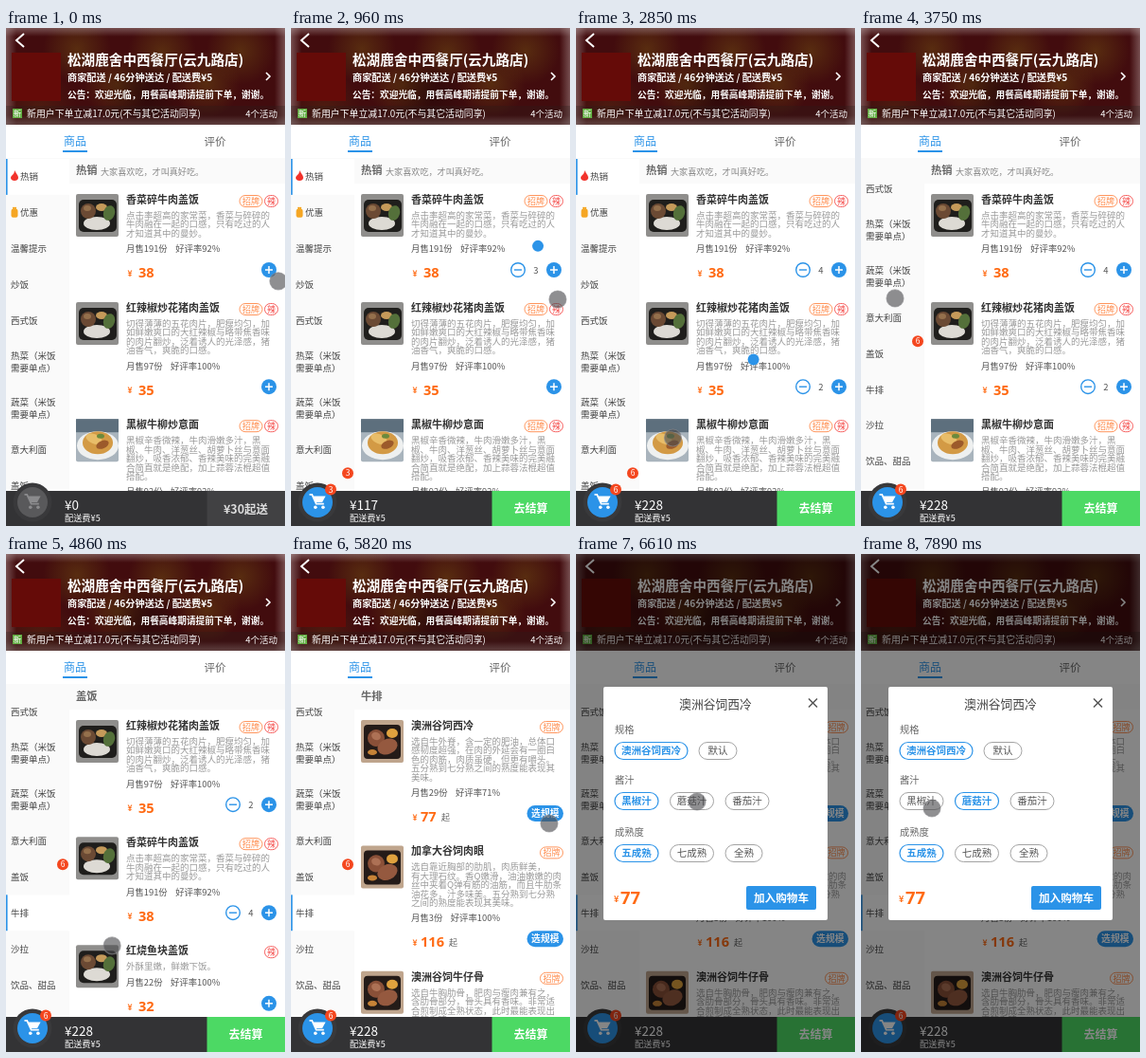
Write an HTML page with a canvas that moves like this. It is 295 by 525 pixels and loops after 8 s.

```html
<!DOCTYPE html>
<html lang="zh-CN">
<head>
<meta charset="utf-8">
<title>点餐</title>
<style>
html, body { margin: 0; width: 100%; height: 100%; overflow: hidden; background: #fff; }
canvas { display: block; width: 295px; height: 525px; }
</style>
</head>
<body>
<canvas id="stage"></canvas>
<script>
const W = 295, H = 525, LOOP = 8000;
const LIST_TOP = 137, BAR_TOP = 488, SIDE_W = 67, LINE = 9.2;
const BLUE = '#2b93e8', ORANGE = '#ff6a13', RED = '#f4471f', GREEN = '#4cd964';
const FONT = '"Noto Sans CJK SC", "Noto Sans CJK", "Noto Sans", sans-serif';
const PRICE_FONT = '"Noto Sans", sans-serif';

const canvas = document.getElementById('stage');
const ctx = canvas.getContext('2d');
const ratio = window.devicePixelRatio || 1;
canvas.width = W * ratio;
canvas.height = H * ratio;

// Menu content
const pork = {
  name: '红辣椒炒花猪肉盖饭', photo: 'rice', tags: ['招牌', '辣'], sold: 97, rate: 100, price: 35, id: 'pork',
  desc: ['切得薄薄的五花肉片，肥瘦均匀，加', '如鲜嫩爽口的大红辣椒与略带焦香味', '的肉片翻炒，泛着诱人的光泽感，猪', '油香气，爽脆的口感。']
};
const beef = {
  name: '香菜碎牛肉盖饭', photo: 'rice', tags: ['招牌', '辣'], sold: 191, rate: 92, price: 38, id: 'beef',
  desc: ['点击率超高的家常菜，香菜与碎碎的', '牛肉融在一起的口感，只有吃过的人', '才知道其中的曼妙。']
};
const pasta = {
  name: '黑椒牛柳炒意面', photo: 'pasta', tags: ['招牌', '辣'], sold: 92, rate: 92, price: 36,
  desc: ['黑椒辛香微辣，牛肉滑嫩多汁，黑', '椒、牛肉、洋葱丝、胡萝卜丝与意面', '翻炒，吸香浓郁、香辣美味的完美融', '合简直就是绝配，加上蒜蓉法棍超值', '搭配。']
};
const fish = {
  name: '红烧鱼块盖饭', photo: 'rice', tags: ['辣'], sold: 22, rate: 100, price: 32,
  desc: ['外酥里嫩，鲜嫩下饭。']
};
const steak = (name, sold, rate, price, desc) =>
  ({ name, sold, rate, price, desc, photo: 'steak', tags: ['招牌'], options: true });

const hot = { title: '热销', note: '大家喜欢吃，才叫真好吃。', items: [beef, pork, pasta] };
const rice = { title: '盖饭', items: [pork, beef, fish] };
const steaks = { title: '牛排', items: [
  steak('澳洲谷饲西冷', 29, 71, 77, ['选自牛外脊，含一定的肥油，总体口', '感韧度超强，在肉的外延会有一圈白', '色的肉筋，肉质虽硬，但更有嚼头。', '五分熟到七分熟之间的熟度能表现其', '美味。']),
  steak('加拿大谷饲肉眼', 3, 100, 116, ['选自靠近胸部的肋肌，肉质鲜美，', '有大理石纹。香Q嫩滑，油油嫩嫩的肉', '丝中夹着Q弹有筋的油筋，而且牛肋条', '油花多，汁多味美。五分熟到七分熟', '之间的熟度能表现其美味。']),
  steak('澳洲谷饲牛仔骨', 8, 100, 98, ['选自牛胸肋骨，肥肉与瘦肉兼有之，', '含肋骨部分，骨头具有香味。非常适', '合煎制成全熟状态，此时最能表现出', '肉的香味。'])
] };
const categories = [['热销'], ['优惠'], ['温馨提示'], ['炒饭'], ['西式饭'], ['热菜（米饭', '需要单点）'],
  ['蔬菜（米饭', '需要单点）'], ['意大利面'], ['盖饭'], ['牛排'], ['沙拉'], ['饮品、甜品']];

// Timeline
const taps = [[150, 'beef'], [540, 'beef'], [935, 'beef'], [1320, 'beef'], [2040, 'pork'], [2705, 'pork']]
  .map(([time, id]) => ({ time, id }));
const FLIGHT = 405, PICK_STEAK = 4860, OPEN_DIALOG = 5940, PICK_SAUCE = 7500;
const tapPoint = { beef: [277, 243], pork: [277, 390] };
const pointerPath = [
  [0, 288, 267], [150, 277, 244], [930, 277, 244], [960, 282, 286], [1100, 282, 284],
  [1300, 277, 245], [1500, 277, 245], [1950, 277, 390], [2705, 277, 390], [2850, 103, 432],
  [2990, 30, 430], [3240, 34, 310], [3510, 36, 260], [3800, 36, 290], [4440, 22, 384],
  [4560, 25, 385], [4740, 25, 385], [4860, 112, 413], [5400, 190, 350], [5820, 273, 284],
  [5940, 273, 284], [6060, 270, 306], [6610, 128, 261], [6920, 127, 259], [7220, 129, 262],
  [7500, 128, 261], [7690, 102, 296], [7890, 75, 268], [8000, 75, 268]
];
const sidePath = [[0, 0], [2990, 0], [3120, 55], [3240, 110], [3360, 133], [3700, 139], [4440, 142], [LOOP, 142]];

function along(path, t) {
  const i = Math.max(1, path.findIndex(p => p[0] >= t));
  const a = path[i - 1], b = path[i];
  const k = (t - a[0]) / (b[0] - a[0]);
  return a.slice(1).map((v, n) => v + (b[n + 1] - v) * k);
}
const easeInOut = k => k * k * (3 - 2 * k);
const clamp01 = k => Math.min(1, Math.max(0, k));

// Drawing helpers
function text(str, x, y, size, color, { bold = false, align = 'left', font = FONT } = {}) {
  ctx.font = `${bold ? 'bold ' : ''}${size}px ${font}`;
  ctx.textAlign = align;
  ctx.textBaseline = 'alphabetic';
  ctx.fillStyle = color;
  ctx.fillText(str, x, y + size * 0.37);
}
function rect(x, y, w, h, color) {
  ctx.fillStyle = color;
  ctx.fillRect(x, y, w, h);
}
function ellipse(x, y, rx, ry, color, turn = 0) {
  ctx.beginPath();
  ctx.ellipse(x, y, rx, ry, turn, 0, 7);
  ctx.fillStyle = color;
  ctx.fill();
}
const disc = (x, y, r, color) => ellipse(x, y, r, r, color);
function stroke(points, color, width) {
  ctx.beginPath();
  points.forEach(([x, y]) => ctx.lineTo(x, y));
  ctx.strokeStyle = color;
  ctx.lineWidth = width;
  ctx.stroke();
}
function box(x, y, w, h, r, fill, line, width = 1) {
  ctx.beginPath();
  ctx.roundRect(x, y, w, h, r);
  if (fill) { ctx.fillStyle = fill; ctx.fill(); }
  if (line) { ctx.strokeStyle = line; ctx.lineWidth = width; ctx.stroke(); }
}
function glow(x, y, r, rgb, alpha) {
  const g = ctx.createRadialGradient(x, y, 0, x, y, r);
  g.addColorStop(0, `rgba(${rgb},${alpha})`);
  g.addColorStop(1, `rgba(${rgb},0)`);
  rect(0, 0, W, 102, g);
}
// A soft light fringe running inward from one header edge.
function fringe(x0, y0, x1, y1) {
  const g = ctx.createLinearGradient(x0, y0, x1, y1);
  g.addColorStop(0, 'rgba(190,170,170,.42)');
  g.addColorStop(1, 'rgba(190,170,170,0)');
  rect(0, 0, W, 102, g);
}
function clipped(x, y, w, h, draw) {
  ctx.save();
  ctx.beginPath();
  ctx.rect(x, y, w, h);
  ctx.clip();
  draw();
  ctx.restore();
}
function badge(n, x, y) {
  disc(x, y, 6, RED);
  text(n, x, y, 8.5, '#fff', { align: 'center' });
}

function drawHeader() {
  rect(0, 0, W, 102, '#420c0e');
  [[75, 22], [118, 60], [165, 25], [212, 58], [248, 24]].forEach(([x, y]) => glow(x, y, 36, '110,76,18', 0.5));
  glow(35, 85, 40, '95,50,18', 0.4);
  glow(148, 70, 45, '25,8,6', 0.5);
  fringe(0, 0, 11, 0);
  fringe(W, 0, W - 11, 0);
  fringe(0, 0, 0, 9);
  fringe(0, 102, 0, 92);
  rect(0, 82, W, 20, 'rgba(40,32,28,.3)');
  stroke([[19, 6], [11, 13], [19, 20]], '#fff', 2);
  rect(6, 26, 52, 51, '#650b08');
  text('松湖鹿舍中西餐厅(云九路店)', 65, 34, 14.6, '#fff', { bold: true });
  text('商家配送 / 46分钟送达 / 配送费¥5', 65, 52, 10.2, '#fff', { bold: true });
  text('公告：欢迎光临，用餐高峰期请提前下单，谢谢。', 65, 70, 9.7, '#fff', { bold: true });
  stroke([[275, 47], [279, 51], [275, 55]], '#fff', 1.6);
  rect(7, 85, 10, 10, '#62ad42');
  text('新', 12, 90, 8.5, '#fff', { align: 'center' });
  text('新用户下单立减17.0元(不与其它活动同享)', 22, 90, 9.9, '#fff');
  text('4个活动', 287, 90, 9.5, '#fff', { align: 'right' });
}

function drawTabs() {
  rect(0, 102, W, 35, '#fff');
  text('商品', 73, 120, 12, BLUE, { align: 'center' });
  text('评价', 221, 120, 11.5, '#666', { align: 'center' });
  rect(60, 129, 26, 2, BLUE);
}

function drawFlame(x, y) {
  ctx.beginPath();
  ctx.moveTo(x, y - 6);
  ctx.bezierCurveTo(x + 2, y - 2, x + 4, y - 1, x + 4, y + 2);
  ctx.bezierCurveTo(x + 4, y + 6, x - 4, y + 6, x - 4, y + 2);
  ctx.bezierCurveTo(x - 4, y - 1, x, y - 1, x, y - 6);
  ctx.fillStyle = '#f2322b';
  ctx.fill();
}

function drawSidebar(t, total) {
  const selected = t < PICK_STEAK ? 0 : 9;
  rect(0, LIST_TOP, SIDE_W, BAR_TOP - LIST_TOP, '#fafafa');
  clipped(0, LIST_TOP, SIDE_W + 1, BAR_TOP - LIST_TOP, () => {
    let y = LIST_TOP + 1 - along(sidePath, t)[0];
    categories.forEach((lines, i) => {
      const h = lines.length > 1 ? 49 : 37.9;
      const mid = y + h / 2;
      if (i === selected) {
        rect(0, y, SIDE_W, h, '#fff');
        rect(0, y, 1.6, h, BLUE);
      }
      if (i === 0) drawFlame(9, mid - 1);
      if (i === 1) {
        box(5.5, mid - 4, 7, 9, 2, '#f5a623');
        rect(7, mid - 6, 4, 2, '#f5a623');
      }
      lines.forEach((line, n) =>
        text(line, i < 2 ? 15 : 5, mid + (n - (lines.length - 1) / 2) * 12.5, 9.5, '#444'));
      if (i === 8 && total) badge(total, 60, mid - 13);
      y += h;
    });
  });
}

const photos = {
  rice(x, y) {
    box(x, y, 45, 45, 2, '#8f8e8c');
    box(x + 3, y + 6, 40, 34, 5, '#1f1e1c');
    ellipse(x + 22, y + 31, 14, 7, '#dddad4');
    ellipse(x + 13, y + 18, 8, 8, '#6b4a34');
    ellipse(x + 12, y + 15, 4, 3, '#94704c');
    ellipse(x + 27, y + 14, 6, 4, '#c59a5a');
    ellipse(x + 35, y + 20, 6, 8, '#54703a', 0.3);
  },
  pasta(x, y) {
    box(x, y, 45, 45, 2, '#a9b4bd');
    rect(x, y, 45, 14, '#5d6f7d');
    ellipse(x + 23, y + 28, 22, 15, '#eef0f0');
    ellipse(x + 23, y + 25, 16, 12, '#d39a45');
    ellipse(x + 19, y + 21, 9, 5, '#e8bd69', 0.4);
    ellipse(x + 28, y + 27, 7, 4, '#9c5a2b', -0.4);
    ellipse(x + 26, y + 18, 4, 2.5, '#6c8a3c');
  },
  steak(x, y) {
    box(x, y, 45, 45, 2, '#bfa58d');
    box(x + 3, y + 5, 39, 36, 4, '#241b18');
    ellipse(x + 16, y + 19, 9, 9, '#8a5038', 0.4);
    ellipse(x + 28, y + 28, 11, 8, '#95593f', -0.4);
    ellipse(x + 16, y + 17, 5, 4, '#ad7155', 0.4);
    ellipse(x + 33, y + 14, 6, 5, '#e0a23e');
    ellipse(x + 12, y + 34, 5, 3, '#c78337');
  }
};

function drawTags(tags, y) {
  let right = 287.5;
  [...tags].reverse().forEach(tag => {
    const w = tag.length > 1 ? 24 : 14;
    const color = tag.length > 1 ? '#ff8a4a' : '#f5504e';
    box(right - w, y - 6, w, 12, 6, null, color, 0.9);
    text(tag, right - w / 2, y, 9, color, { align: 'center' });
    right -= w + 2.5;
  });
}

function drawStepper(count, y) {
  disc(278, y, 8, BLUE);
  stroke([[274, y], [282, y]], '#fff', 1.5);
  stroke([[278, y - 4], [278, y + 4]], '#fff', 1.5);
  if (!count) return;
  box(232.7, y - 7.3, 14.6, 14.6, 7.3, '#fff', BLUE, 1.4);
  stroke([[236, y], [244, y]], BLUE, 1.4);
  text(count, 259, y, 9.5, '#555', { align: 'center' });
}

function drawPrice(price, x, y, size) {
  text(price, x, y, size, ORANGE, { bold: true, font: PRICE_FONT });
}

const itemHeight = item => 86.4 + LINE * item.desc.length;

function drawItem(item, y, counts) {
  const meta = y + 24.4 + LINE * item.desc.length;
  photos[item.photo](74, y - 6);
  text(item.name, 127, y, 11, '#333', { bold: true });
  drawTags(item.tags, y + 1.5);
  item.desc.forEach((line, i) => text(line, 127, y + 16.3 + i * 9.5, 9.5, '#999'));
  text(`月售${item.sold}份    好评率${item.rate}%`, 127, meta, 9.4, '#555');
  text('¥', 128.5, meta + 26, 8.5, ORANGE, { bold: true });
  drawPrice(item.price, item.options ? 137 : 140, meta + 25, 14.6);
  if (item.options) {
    text('起', item.price > 99 ? 167 : 159, meta + 26, 9, '#666');
    box(249.5, meta + 13.5, 38.5, 17, 8.5, BLUE);
    text('选规模', 268.8, meta + 22, 9.8, '#fff', { bold: true, align: 'center' });
  } else {
    drawStepper(counts[item.id], meta + 22);
  }
}

function drawSection(section, top, counts) {
  rect(SIDE_W, top, W - SIDE_W, 27, '#fafafa');
  text(section.title, 74, top + 13, 11.3, '#666', { bold: true });
  if (section.note) text(section.note, 100, top + 15, 9.1, '#888');
  let y = top + 44;
  section.items.forEach(item => {
    drawItem(item, y, counts);
    y += itemHeight(item);
  });
}

function drawList(t, counts) {
  clipped(SIDE_W, LIST_TOP, W - SIDE_W, BAR_TOP - LIST_TOP, () => {
    if (t < PICK_STEAK) return drawSection(hot, LIST_TOP, counts);
    const span = 31 + rice.items.reduce((sum, item) => sum + itemHeight(item), 0);
    const top = LIST_TOP - span * easeInOut(clamp01((t - 4950) / 400));
    drawSection(rice, top, counts);
    drawSection(steaks, top + span, counts);
  });
}

function drawCartIcon(x, y, color) {
  ctx.save();
  ctx.translate(x, y);
  ctx.scale(0.9, 0.9);
  stroke([[-10, -8], [-7, -8], [-2, 3], [7, 3]], color, 2);
  ctx.beginPath();
  [[-6, -6], [9, -6], [5, 1], [-3, 1]].forEach(p => ctx.lineTo(...p));
  ctx.fillStyle = color;
  ctx.fill();
  disc(-3, 7, 2, color);
  disc(6, 7, 2, color);
  ctx.restore();
}

function drawBar(total, cost) {
  rect(0, BAR_TOP, W, H - BAR_TOP, '#333335');
  rect(212.5, BAR_TOP, W - 212.5, H - BAR_TOP, total ? GREEN : '#414143');
  text(total ? '去结算' : '¥30起送', 253.5, 507, total ? 12 : 12.5, total ? '#fff' : '#ddd', { bold: true, align: 'center' });
  disc(28, 500, 20.5, '#39393b');
  disc(28, 500, 16, total ? BLUE : '#59595b');
  drawCartIcon(28.5, 499, total ? '#fff' : '#8b8b8d');
  if (total) badge(total, 42, 486.5);
  text('¥' + cost, 62, 503, 13.5, '#fff');
  text('配送费¥5', 62, 517, 9.2, '#fff');
}

function drawBall(tap, t) {
  const k = (t - tap.time) / FLIGHT;
  if (k < 0 || k > 1) return;
  const [x, y] = tapPoint[tap.id];
  const bend = (a, b, c) => (1 - k) * (1 - k) * a + 2 * k * (1 - k) * b + k * k * c;
  disc(bend(x, (x + 29) / 2, 29), bend(y, y - 118, 497), 6, BLUE);
}

function drawChips(label, y, chips, chosen) {
  text(label, 41, y, 10.3, '#666');
  chips.forEach(([name, x, w], i) => {
    const on = i === chosen;
    box(x, y + 13.5, w, 18, 9, '#fff', on ? BLUE : '#999', on ? 1.2 : 0.9);
    text(name, x + w / 2, y + 22.5, 10.5, on ? BLUE : '#555', { bold: on, align: 'center' });
  });
}

function drawDialog(t) {
  const shade = 0.3 + 0.18 * clamp01((t - OPEN_DIALOG) / 300);
  rect(0, 0, W, H, `rgba(0,0,0,${shade})`);
  box(29, 140, 237, 246, 2, '#fff');
  text('澳洲谷饲西冷', 147.5, 158, 12.8, '#444', { align: 'center' });
  stroke([[246, 152.5], [255, 161.5]], '#555', 1.5);
  stroke([[255, 152.5], [246, 161.5]], '#555', 1.5);
  drawChips('规格', 185, [['澳洲谷饲西冷', 41, 77], ['默认', 130, 40]], 0);
  drawChips('酱汁', 238, [['黑椒汁', 41, 46], ['蘑菇汁', 99.5, 46], ['番茄汁', 158, 46]], t < PICK_SAUCE ? 0 : 1);
  drawChips('成熟度', 293, [['五成熟', 41, 46], ['七成熟', 99.5, 46], ['全熟', 158, 39]], 0);
  text('¥', 40, 364, 9, ORANGE, { bold: true });
  drawPrice(77, 47, 362, 18.4);
  box(180, 350, 74, 25, 2, BLUE);
  text('加入购物车', 217, 362.5, 11.6, '#fff', { bold: true, align: 'center' });
}

function drawPointer(t) {
  const [x, y] = along(pointerPath, t);
  disc(x, y, 9, 'rgba(75,75,78,.62)');
  ctx.strokeStyle = 'rgba(135,135,138,.65)';
  ctx.lineWidth = 1.2;
  ctx.stroke();
}

function render(t) {
  const done = taps.filter(tap => tap.time <= t);
  const counts = { beef: 0, pork: 0 };
  done.forEach(tap => counts[tap.id]++);
  // Each portion carries a packing fee of 1.
  const cost = counts.beef * (beef.price + 1) + counts.pork * (pork.price + 1);

  ctx.setTransform(ratio, 0, 0, ratio, 0, 0);
  rect(0, 0, W, H, '#fff');
  drawHeader();
  drawTabs();
  drawList(t, counts);
  drawSidebar(t, done.length);
  drawBar(done.length, cost);
  done.forEach(tap => drawBall(tap, t));
  if (t >= OPEN_DIALOG) drawDialog(t);
  drawPointer(t);
}

const start = performance.now();
function tick() {
  render((performance.now() - start) % LOOP);
  requestAnimationFrame(tick);
}
tick();
</script>
</body>
</html>
```
